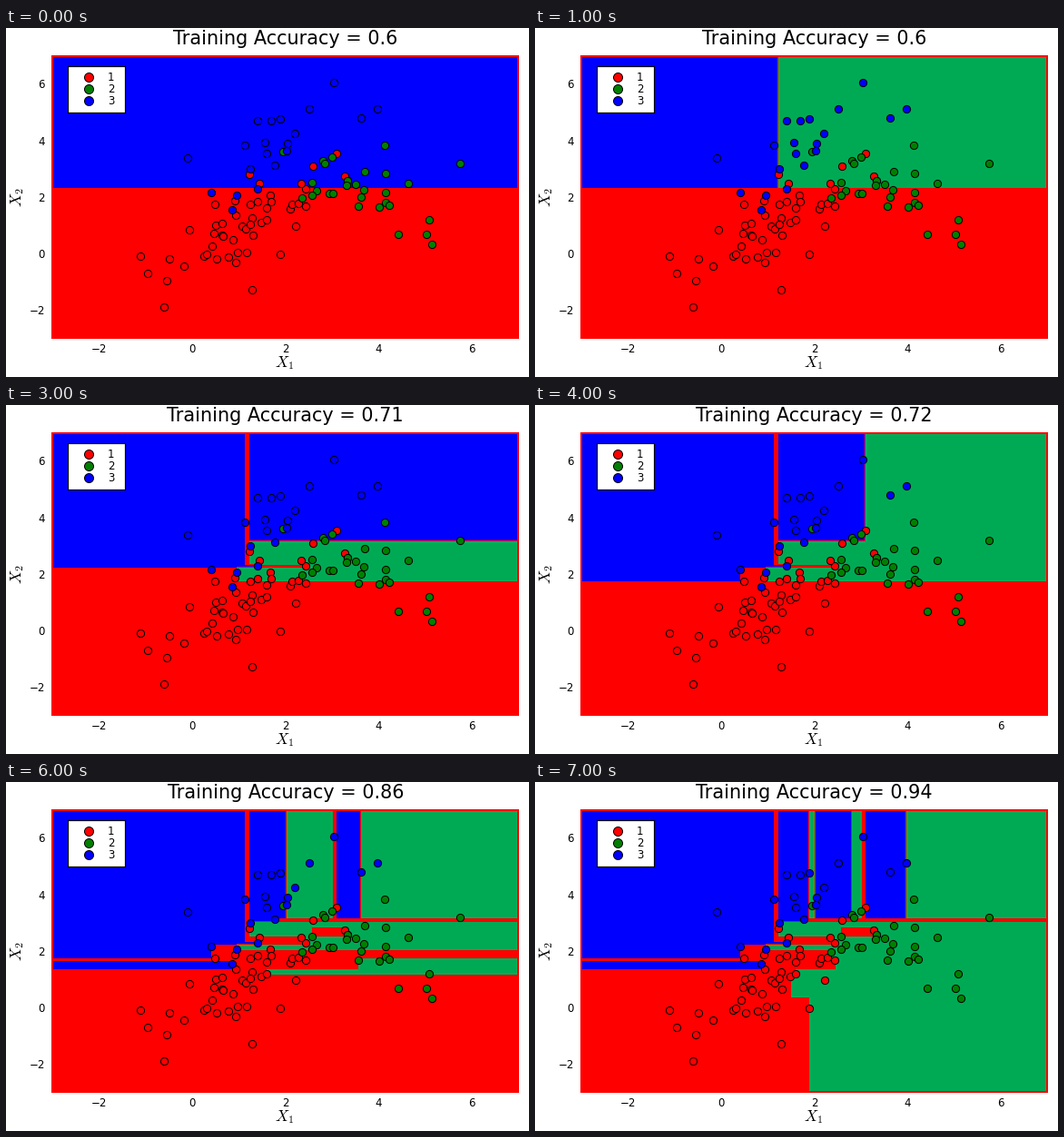
Recreate the animation shown at these times as a matplotlib script. Size 576 px wide and 384 px high, loop 8000 ms.

```python
import numpy as np
import matplotlib.pyplot as plt
from matplotlib.animation import FuncAnimation
from matplotlib.patches import Rectangle

W, H, DPI = 576, 384, 100
PX = 72 / DPI  # points per pixel
plt.rcParams.update({"font.family": "DejaVu Sans", "mathtext.fontset": "cm"})

L, T, R, B = 52, 32, 563, 340  # plot area in pixels
RED, GREEN, BLUE = range(3)
FILL = np.array([[255, 0, 0], [0, 170, 85], [0, 0, 255], [255, 255, 255]], np.uint8)
MARKER = ["#ff0000", "#008000", "#0000ff"]

# Samples of each class, in pixels
reds = [
    (148, 250.5), (156, 270), (177, 278), (174, 307), (180, 253.5),
    (196, 262), (202, 222), (271, 287.5), (302, 248.5), (319, 217.5),
    (217.5, 251), (221, 249), (227, 240), (231.5, 253.5), (229, 226),
    (231, 216.5), (237.5, 214.5), (238, 228), (239, 229), (230, 193.5),
    (250, 233), (245, 252), (253, 258), (255, 247), (265, 247),
    (260, 218), (264, 221), (252.5, 205.5), (252, 189.5), (270.5, 208.5),
    (269, 215.5), (269, 193.5), (271.5, 227.5), (277, 190.5), (281, 213.5),
    (286.5, 211), (286.5, 198), (291, 184), (291.5, 190.5), (279, 170.5),
    (268, 160.5), (312.5, 198.5), (314.5, 194), (321.5, 193), (330, 195.5),
    (329.5, 177), (325, 170.5), (338, 151.5), (364, 137.5), (373, 163)]
greens = [
    (304.5, 135.5), (349, 145.5), (351, 149), (359, 141.5), (416.5, 128.5),
    (499.5, 148.5), (394.5, 157.5), (418, 160), (443, 171), (375.5, 167.5),
    (375.5, 168), (375, 172.5), (385, 172), (393.5, 177.5), (391, 186),
    (387.5, 195.5), (410.5, 196.5), (418, 180.5), (417.5, 192), (421.5, 194.5),
    (336.5, 170), (342, 178.5), (336.5, 183.5), (326, 187), (355.5, 182),
    (360, 181.5), (465.5, 210.5), (462.5, 226.5), (432, 226.5), (469, 237.5)]
blues = [
    (199.5, 142.5), (226, 181), (254, 184), (249, 199.5), (263, 128.5),
    (268.5, 155), (276.5, 177), (276.5, 101.5), (291.5, 101.5), (301.5, 100),
    (284.5, 125.5), (287, 137.5), (296, 151), (309.5, 127), (308.5, 135),
    (317.5, 115.5), (333.5, 88.5), (361, 59.5), (390.5, 98.5), (408.5, 88.5)]

groups = [reds, greens, blues]
samples = np.array([(x, y, c) for c, g in enumerate(groups) for x, y in g])


def cut_on(axis):
    """Maker of nodes that split along one axis from a given depth on."""
    return lambda at, depth, low=None, high=None: (axis, at, depth, low, high)


X, Y = cut_on(0), cut_on(1)

# Upper part
top_left = X(199.6, 3, None, X(263.1, 4))
columns = X(364.5, 5,
            X(359.7, 6, X(308.8, 7, X(302.5, 8), X(348.7, 8))),
            X(391, 7, None, X(409, 8)))
ledge = Y(154.5, 6, X(300, 7), Y(160.3, 6, None, X(374, 7, X(337, 7))))
top_right = Y(170.2, 3, Y(150.5, 4, columns, ledge), X(326, 6))

# Lower part
seam = X(330, 3, X(277, 4))
middle = X(254.5, 4, X(226.4, 5), Y(184.6, 6, None, X(322, 8)))
shelf = X(388, 6, X(250, 7, Y(197, 7), X(331, 8)))
floor = Y(212.5, 7, X(286.8, 7), Y(236.8, 8, X(281.5, 8), X(302.5, 8)))
bottom = Y(193.8, 3, middle, Y(205.8, 6, shelf, floor))

tree = Y(176, 1, X(268.3, 2, top_left, top_right), Y(178.7, 3, seam, bottom))


def leaves(node, depth, pts, box):
    """Yield (majority class, box) for each leaf; ties go to the first class."""
    if node is None or node[2] > depth:
        yield np.bincount(pts[:, 2].astype(int), minlength=3).argmax(), box
        return
    axis, at, _, low, high = node
    below = pts[:, axis] < at
    near, far = list(box), list(box)
    near[axis + 2] = far[axis] = round(at)
    yield from leaves(low, depth, pts[below], near)
    yield from leaves(high, depth, pts[~below], far)


def paint(depth):
    cls = np.full((H, W), 3)
    cls[T - 2:B + 2, L - 2:R + 2] = RED
    for c, (x0, y0, x1, y1) in leaves(tree, depth, samples, (L, T, R, B)):
        cls[y0:y1, x0:x1] = c
    # Thin red line between blue and green
    edge = np.zeros_like(cls, bool)
    edge[:, :-1] |= cls[:, :-1] * cls[:, 1:] == GREEN * BLUE
    edge[:-1] |= cls[:-1] * cls[1:] == GREEN * BLUE
    cls[edge] = RED
    return FILL[cls]


fig = plt.figure(figsize=(W / DPI, H / DPI), dpi=DPI, facecolor="white")
ax = fig.add_axes([0, 0, 1, 1])
ax.axis("off")


def label(x, y, s, size, ha="center", va="baseline", **kw):
    return ax.text(x, y, s, fontsize=size * PX, ha=ha, va=va, zorder=6, **kw)


def dots(points, color, d, z):
    x, y = zip(*points)
    ax.scatter(x, y, s=(d * PX) ** 2, c=color, edgecolors="black",
               linewidths=PX, zorder=z)


area = ax.imshow(paint(1), extent=(0, W, H, 0), interpolation="nearest",
                 aspect="auto")
ax.set_xlim(0, W)
ax.set_ylim(H, 0)

ax.add_patch(Rectangle((68, 41.5), 62.5, 51.5, fc="white", ec="black",
                       lw=1.2 * PX, zorder=4))
for c, points in enumerate(groups):
    dots(points, MARKER[c], 8.2, 2)
    y = 54 + 13 * c
    dots([(90.7, y)], MARKER[c], 10, 5)
    label(112, y + 4.3, str(c + 1), 11.8, ha="left")

for v in range(-2, 7, 2):
    s = str(v).replace("-", "\u2212")
    label(204.8 + 51.3 * v, 357, s, 11.8)
    label(43, 252.8 - 31.05 * v, s, 11.8, ha="right")

label(306.7, 369, "$X_1$", 17, va="center")
label(12.5, 186.5, "$X_2$", 17, va="center", rotation=90)
title = label(307.8, 18.4, "", 20.75)

accuracy = [0.6, 0.6, 0.64, 0.71, 0.72, 0.8, 0.86, 0.94]


def update(i):
    area.set_data(paint(i + 1))
    title.set_text(f"Training Accuracy = {accuracy[i]}")
    return area, title


anim = FuncAnimation(fig, update, frames=len(accuracy), interval=1000,
                     repeat=True, repeat_delay=0, blit=False)
plt.show()
```
